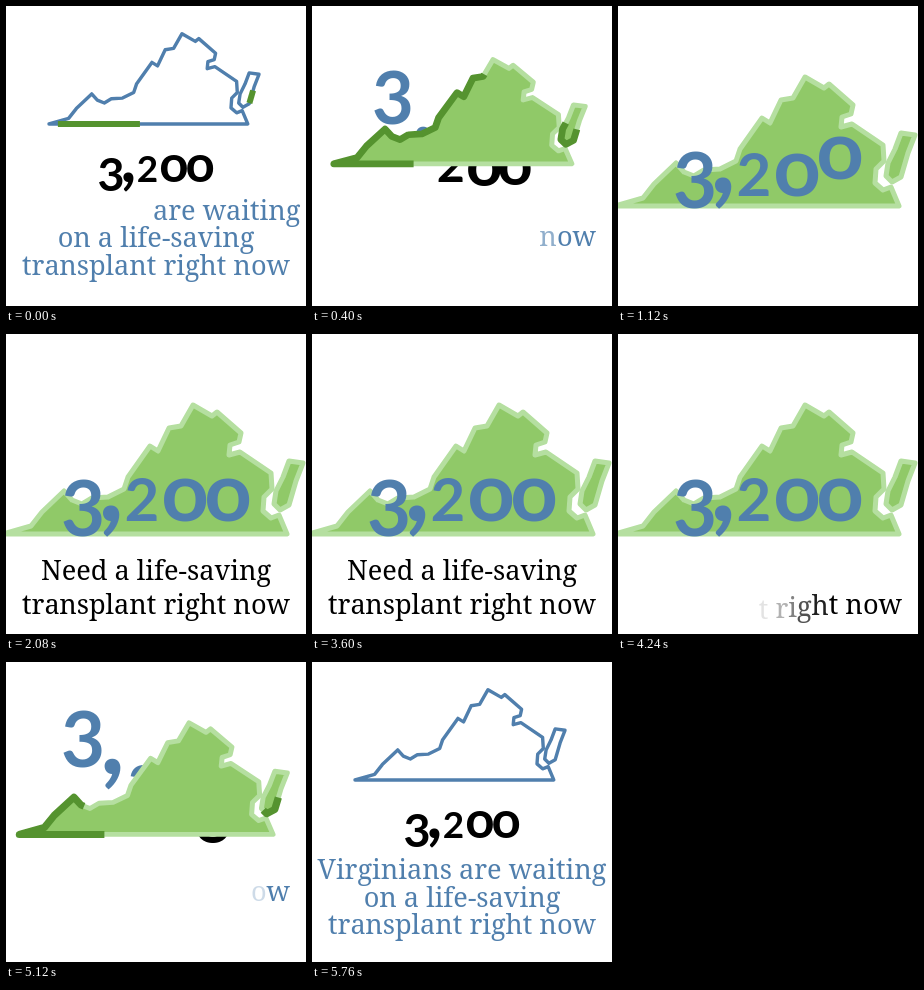
An HTML page with a canvas for the animation above (5.84 s loop, 300 by 300 pixels).

```html
<!DOCTYPE html>
<html lang="en">
<head>
<meta charset="utf-8">
<title>Waiting for a transplant</title>
<style>
html, body { margin: 0; width: 100%; height: 100%; overflow: hidden; background: #fff; }
canvas { display: block; width: 100vw; height: 100vh; }
</style>
</head>
<body>
<canvas id="stage"></canvas>
<script>
const LOOP = 5840;
const BLUE = [80, 127, 173], PALE = [181, 223, 160], BLACK = [0, 0, 0];
const FILL = '#90c968', DARK = '#55932f';
const SERIF = '"Noto Serif", serif';

const canvas = document.getElementById('stage');
const ctx = canvas.getContext('2d');
const ratio = Math.max(1, window.devicePixelRatio || 1);
canvas.width = canvas.height = 300 * ratio;

const clamp = (v, lo = 0, hi = 1) => Math.min(hi, Math.max(lo, v));
const mix = (a, b, p) => a + (b - a) * p;
const ramp = (t, a, b) => clamp((t - a) / (b - a));
const smooth = p => p * p * (3 - 2 * p);
const easeOut = p => 1 - (1 - p) ** 2;
const blend = (a, b, p) => `rgb(${a.map((v, i) => Math.round(mix(v, b[i], p)))})`;

// The second half of the loop runs the first half backwards
function mirror(t, sum) {
  return t > 5760 ? t - LOOP : Math.min(t, sum - t);
}

// ---- map: x,y corners, clockwise from the lower right ----
const corners = text => text.split(' ').map(p => p.split(',').map(Number));
const land = corners('281,200 -3,200 25,192 36,178 58,157 66,166 76,170 86,164 102,163 118,155 ' +
  '122,143 144,112 152,117 163,94 175,92 187,71 206,82 211,78 235,99 233,108 224,111 223,121 ' +
  '234,118 265,139 266,155 258,163 257,177 265,184 273,181');
const shore = corners('297,129 290,147 283,171 274,176 268,170 270,157 277,143 283,127');

function outline(pts) {
  ctx.beginPath();
  pts.forEach(p => ctx.lineTo(p[0], p[1]));
  ctx.closePath();
}

const edges = pts => pts.map((p, i) => {
  const q = pts[(i + 1) % pts.length];
  return { p, q, len: Math.hypot(q[0] - p[0], q[1] - p[1]) };
});

// Strokes the stretch of the closed path between two fractions of its length
function strokePart(pts, from, to) {
  if (to - from < 0.01) return;
  const list = edges(pts), total = list.reduce((sum, e) => sum + e.len, 0);
  let d = 0;
  ctx.beginPath();
  for (const { p, q, len } of list) {
    const a = clamp((from * total - d) / len), b = clamp((to * total - d) / len);
    if (b > a) {
      for (const k of [a, b]) ctx.lineTo(mix(p[0], q[0], k), mix(p[1], q[1], k));
    }
    d += len;
  }
  ctx.stroke();
}

function drawMap(t) {
  const p = ramp(t, 0, 870), s = 0.7 + 0.3 * p, tint = ramp(t, 60, 280);
  ctx.save();
  ctx.translate(43 - 46 * p, 118 + 82 * p ** 0.93);
  ctx.scale(s, s - 0.12 * p * (1 - p));
  ctx.translate(3, -200);
  ctx.lineJoin = ctx.lineCap = 'round';
  for (const shape of [land, shore]) {
    outline(shape);
    ctx.globalAlpha = tint;
    ctx.fillStyle = FILL;
    ctx.fill();
    ctx.globalAlpha = 1;
    ctx.lineWidth = mix(3.4, 5, tint) / s;
    ctx.strokeStyle = blend(BLUE, PALE, tint);
    ctx.stroke();
  }
  // A dark line runs round each shape, then draws back
  const from = mix(0.2, 0.245, ramp(t, 0, 300));
  const to = Math.min(0.24 + 0.0028 * (t + 40), mix(1, 0.24, ramp(t, 150, 760)));
  ctx.lineWidth = mix(6, 8, p) / s;
  ctx.lineCap = 'butt';
  ctx.strokeStyle = DARK;
  strokePart(land, from, to);
  strokePart(shore, from, to);
  ctx.restore();
}

// ---- number: old-style figures, the zeros sit at x-height ----
const figures = [
  { ch: '3', x: 77, drop: 15, size: 76 },
  { ch: ',', x: 105, drop: 0, size: 110 },
  { ch: '2', x: 136, drop: 0, size: 60 },
  { ch: 'o', x: 179, drop: 0, size: 83 },
  { ch: 'o', x: 222, drop: 0, size: 83 }
];

// Each figure rises behind the map and drops in front of it
function drawFigures(t, front) {
  ctx.textAlign = 'center';
  figures.forEach((f, i) => {
    const rise = 480 - 360 * (1 - i / 4) ** 2, fall = 760 + 50 * i, land = fall + 170;
    if ((t >= fall) !== front) return;
    const grow = ramp(t, 0, 430 + 70 * i) ** 2;
    const up = easeOut(ramp(t, rise, fall));
    const down = ramp(t, fall, land) ** 2;
    const settle = 4 * Math.sin(Math.PI * ramp(t, land, land + 120));
    const s = mix(0.615, 1, grow);
    ctx.save();
    ctx.translate(150 + (f.x - 150) * s, mix(176, 187, grow) - 120 * up * (1 - down) + settle);
    ctx.scale(s, s);
    ctx.font = `bold ${f.size}px Lato, sans-serif`;
    ctx.fillStyle = blend(BLACK, BLUE, clamp(up * 4 - 0.4));
    ctx.fillText(f.ch, 0, f.drop);
    ctx.restore();
  });
}

// ---- captions ----
const intro = [['Virginians are waiting', 217], ['on a life-saving', 244.5], ['transplant right now', 272]];
const need = [['Need a life-saving', 246], ['transplant right now', 280]];
const lastLetter = need.map(l => l[0]).join('').replace(/ /g, '').length - 1;

ctx.font = `27px ${SERIF}`;
const captionSize = 27 * 268 / ctx.measureText('transplant right now').width;

// style(index) gives [alpha, y offset] for each visible letter
function drawLetters(lines, color, style) {
  let n = 0;
  ctx.font = `${captionSize}px ${SERIF}`;
  ctx.textAlign = 'left';
  ctx.fillStyle = color;
  for (const [line, y] of lines) {
    const left = 150 - ctx.measureText(line).width / 2;
    [...line].forEach((ch, i) => {
      if (ch === ' ') return;
      const [alpha, dy] = style(n++);
      if (alpha <= 0) return;
      ctx.globalAlpha = alpha;
      ctx.fillText(ch, left + ctx.measureText(line.slice(0, i)).width, y + dy);
    });
  }
  ctx.globalAlpha = 1;
}

function drawIntro(t) {
  const gone = 52.8 * easeOut(ramp(t, -62, 558));
  const lift = -33 * smooth(ramp(t, -110, 470));
  drawLetters(intro, blend(BLUE, BLUE, 0), n => [clamp(n + 1 - gone), lift]);
}

function drawNeed(t) {
  drawLetters(need, '#000', n => {
    const start = 1180 + (lastLetter - n) * 21;
    const p = ramp(t, start, start + 110);
    return [p, 6 * (1 - p)];
  });
}

function draw(now) {
  const t = now % LOOP, bounce = mirror(t, 5600);
  ctx.setTransform(ratio, 0, 0, ratio, 0, 0);
  ctx.fillStyle = '#fff';
  ctx.fillRect(0, 0, 300, 300);
  drawFigures(bounce, false);
  drawMap(mirror(t, 5680));
  drawFigures(bounce, true);
  drawIntro(mirror(t, 5555));
  drawNeed(bounce);
}

let begin = null;
function tick(now) {
  if (begin === null) begin = now;
  draw(now - begin);
  requestAnimationFrame(tick);
}
draw(0);
requestAnimationFrame(tick);
</script>
</body>
</html>
```
